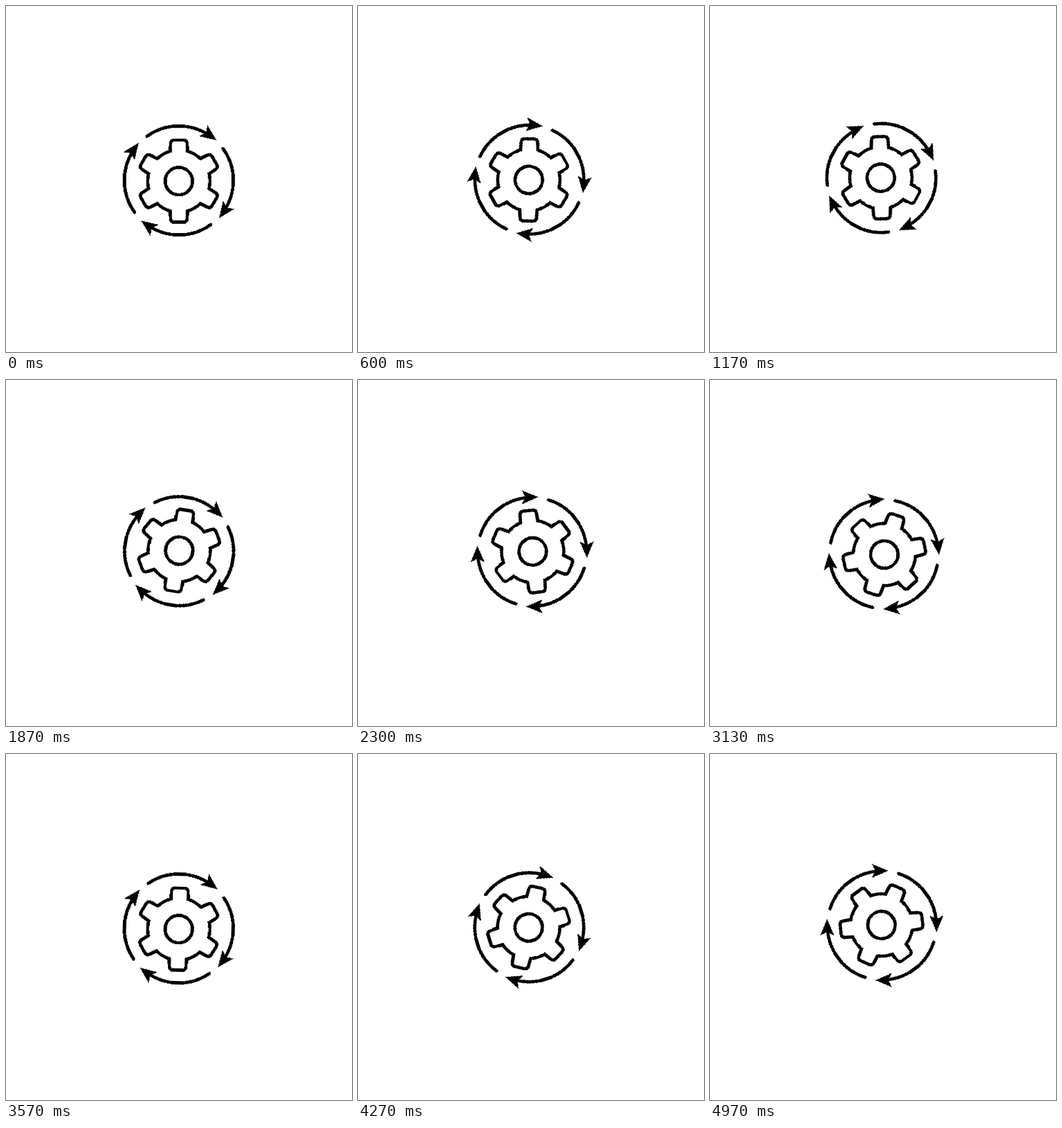
Recreate the animation shown at these times as an HTML page. Size 500 px wide and 500 px high, loop 5.01 s.

```html
<!DOCTYPE html>
<html lang="en">
<head>
<meta charset="utf-8">
<title>Rotating gear</title>
<style>
  html, body { margin: 0; width: 100%; height: 100%; overflow: hidden; background: #fff; }
  svg { display: block; width: 100vw; height: 100vh; shape-rendering: crispEdges; }
  .line { fill: none; stroke: #000; stroke-width: 4.6; stroke-linecap: round; }

  /* 30 poses per second; the small negative delay rounds each change to 10 ms */
  .spin { transform-origin: 0 0; animation: spin 5010ms -5ms infinite; }
  @keyframes spin {
    0% { transform: rotate(0deg); animation-timing-function: steps(149, end); }
    99.135%, 100% { transform: rotate(503.62deg); }
  }
</style>
</head>
<body>
<svg viewBox="-249.75 -249.75 500 500">
  <defs>
    <path id="tooth" class="line" d="M-22.5 -38.97 A45 45 0 0 1 -12.6 -43.2 L-12 -54
      Q-11.7 -59.4 -6.3 -59.4 H6.3 Q11.7 -59.4 12 -54 L12.6 -43.2 A45 45 0 0 1 22.5 -38.97"/>
    <g id="arrow">
      <path class="line" d="M-46.2 -63.8 A78.8 78.8 0 0 1 42.9 -66.1"/>
      <path d="M0 0 L-24 -10.1 L-18.5 0 L-24 10.1 Z" transform="translate(54.5 -58.1) rotate(36)"/>
    </g>
  </defs>

  <g class="spin">
    <g transform="translate(0 2.4)">
      <use href="#arrow"/>
      <use href="#arrow" transform="rotate(90)"/>
      <use href="#arrow" transform="rotate(180)"/>
      <use href="#arrow" transform="rotate(270)"/>
    </g>
    <g transform="translate(0 3.3)">
      <circle class="line" r="19.8"/>
      <use href="#tooth"/>
      <use href="#tooth" transform="rotate(60)"/>
      <use href="#tooth" transform="rotate(120)"/>
      <use href="#tooth" transform="rotate(180)"/>
      <use href="#tooth" transform="rotate(240)"/>
      <use href="#tooth" transform="rotate(300)"/>
    </g>
  </g>
</svg>
</body>
</html>
```
